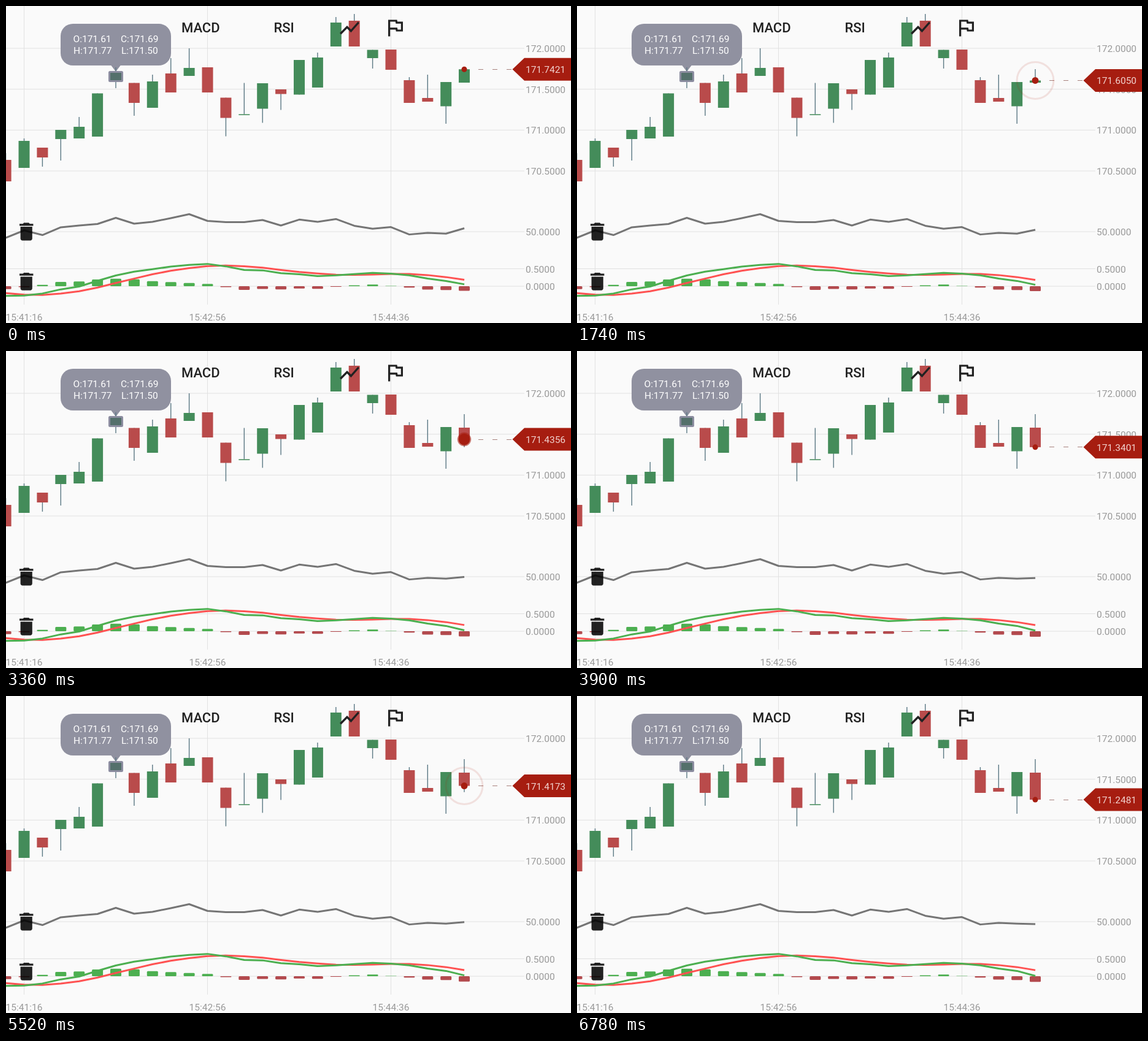
An HTML page that plays this animation: 921x517 px, repeating every 8 s.

```html
<!DOCTYPE html>
<html lang="en">
<head>
<meta charset="utf-8">
<title>Candlestick chart</title>
<style>
  html, body { margin: 0; width: 100%; height: 100%; overflow: hidden; background: #fafafa; }
  svg { display: block; width: 921px; height: 517px; font: 15.5px Roboto, sans-serif; }
</style>
</head>
<body>
<svg id="chart" viewBox="0 0 921 517"></svg>
<script>
const GREEN = '#448c5a', RED = '#b94b4b', WICK = '#5b7884', ACCENT = '#a61d10', DARK = '#212121';
const GRID = '#e1e1e1', UP_BAR = '#4caf50', DOWN_BAR = '#b34a4e';
const LOOP = 8000, BURST = 600, RIPPLE = 575, STEP = 29.9, X = 747, OPEN_Y = 125;

const svg = document.getElementById('chart');
const set = (el, attrs) => { for (const k in attrs) el.setAttribute(k, attrs[k]); };
const add = (tag, attrs, text) => {
  const el = document.createElementNS('http://www.w3.org/2000/svg', tag);
  set(el, attrs);
  if (text) el.textContent = text;
  svg.append(el);
  return el;
};
const rect = (x, y, width, height, fill, rx = 0) => add('rect', { x, y, width, height, fill, rx });
const line = (x1, y1, x2, y2, stroke, w = 1) =>
  add('line', { x1, y1, x2, y2, stroke, 'stroke-width': w });
const label = (x, y, text, fill, extra) => add('text', { x, y, fill, ...extra }, text);
const icon = (x, y, d, fill = DARK) =>
  add('path', { d, fill, transform: `translate(${x} ${y}) scale(1.6)` });
const curve = stroke =>
  add('polyline', { stroke, fill: 'none', 'stroke-width': 3, 'stroke-linejoin': 'round' });

const colX = i => 29.5 + i * STEP;
const priceY = p => 68.8 + (172 - p) * 133.4;
const mean = a => a.reduce((s, v) => s + v, 0) / a.length;

// Closing heights: a ramp and a short run off screen, then the 25 columns in view
const ramp = Array.from({ length: 8 }, (_, k) => 350 - 26 * k);
const before = [236, 232, 213, 246.5, 259, 224, 256, 253.5, 249, 301, 319, 273, 302.5, 296];
const closes = [286, 220, 247, 202, 197, 142.5, 108, 158, 123, 141, 101, 141, 182.5,
  176.5, 126, 143.5, 88, 84, 27, 66, 71.5, 104, 158, 156, 124];
const opens = [251, 264, 231, 217, 216, 213, 122, 125.5, 166, 110, 114, 100, 149.5,
  178, 167.5, 136, 144.5, 133, 66, 24, 85, 71, 121, 150, 163.5];
// Wick length beyond the body: positive above, negative below
const tails = [11, 4, -15, -35, 16, 0, -12, -21, 11, 25, 32, 0, -30,
  51, -23, -26, 0, 8, 9, 11, -17, 0, 5, 38, -28.5];
const past = [...ramp, ...before, ...closes];
const first = ramp.length + before.length;

// RSI over 14 steps, as a height around its 50 line
function rsiY(c, i) {
  let moved = 0;
  for (let k = i - 13; k <= i; k++) moved += Math.abs(c[k] - c[k - 1]);
  return 368 - 61 * (c[i - 14] - c[i]) / moved;
}

// MACD of the 7 and 20 step averages; its signal is a 4 step average
const average = (c, i, n) => mean(c.slice(Math.max(0, i - n + 1), i + 1));
const macdY = (c, i) => 457 - .427 * (average(c, i, 20) - average(c, i, 7));
const signalY = (c, i) => mean([0, 1, 2, 3].map(k => macdY(c, i - k)));
const spread = (c, i) => signalY(c, i) - macdY(c, i);

// Grid and axes
[[69, '172.0000'], [135.7, '171.5000'], [202.4, '171.0000'], [269, '170.5000'],
 [368, '50.0000'], [428.5, '0.5000'], [457, '0.0000']].forEach(([y, text]) => {
  line(0, y, 845, y, GRID);
  label(847, y + 6, text, '#999');
});
['15:41:16', '15:42:56', '15:44:36'].forEach((text, i) => {
  const x = colX(i * 10);
  line(x, 0, x, 487, GRID);
  label(x, 513, text, '#999', { 'text-anchor': 'middle' });
});

// Candles and histogram
const barBox = h => ({ y: h > 0 ? 457 - h : 457, height: Math.abs(h), rx: Math.min(1.5, Math.abs(h) / 2) });
closes.forEach((c, k) => {
  const x = colX(k - 1), o = opens[k], tail = tails[k];
  const top = Math.min(o, c), end = Math.max(o, c);
  line(x, tail > 0 ? top - tail : end - tail, x, top, WICK, 1.4);
  rect(x - 9, top, 18, end - top, c < o ? GREEN : RED);
  const h = spread(past, first + k);
  set(rect(x - 9, 0, 18, 0, h > 0 ? UP_BAR : DOWN_BAR), barBox(h));
});
const liveBar = rect(X - 9, 457, 18, 7, DOWN_BAR);

const lines = [[rsiY, '#757575'], [signalY, '#ff5252'], [macdY, UP_BAR]]
  .map(([rule, color]) => ({ rule, el: curve(color) }));

// Selected candle with callout
rect(89, 29, 180, 68, '#9091a0', 20);
add('path', { d: 'M171 96.5H187L179 107Z', fill: '#9091a0' });
line(179, 100, 179, 106, WICK, 1.4);
add('rect', { x: 168.5, y: 107.5, width: 21, height: 15, rx: 1, fill: '#54706b', stroke: '#8c8da0', 'stroke-width': 3 });
label(109.5, 59, 'O:171.61', '#fff');
label(187, 59, 'C:171.69', '#fff');
label(110, 77.5, 'H:171.77', '#fff');
label(188, 77.5, 'L:171.50', '#fff');

// Toolbar and delete buttons
const title = { 'font-size': 22, 'font-weight': 500 };
label(286, 43, 'MACD', DARK, title);
label(436.5, 43, 'RSI', DARK, title);
icon(540.8, 16.8, 'M3.5 18.49l6-6.01 4 4L22 6.92l-1.41-1.41-7.09 7.97-4-4L2 16.99z');
icon(615, 16, 'M12.36 6l.4 2H18v6h-3.36l-.4-2H7V6h5.36M14 4H5v17h2v-7h5.6l.4 2h7V6h-5.6L14 4z');
const bin = 'M6 19c0 1.1.9 2 2 2h8c1.1 0 2-.9 2-2V7H6v12zM19 4h-3.5l-1-1h-5l-1 1H5v2h14V4z';
[348.8, 430.2].forEach(y => icon(14, y, bin, 'rgba(0,0,0,.87)'));

// Live candle and price flag
const wick = line(X, 103, X, OPEN_Y, WICK, 1.4);
const body = rect(X - 9, 0, 18, 0, GREEN);
const dash = add('line', { x1: 770, x2: 826, stroke: '#86504a', opacity: .7, 'stroke-dasharray': '8 15' });
const ring = add('circle', { cx: X, fill: 'none', stroke: ACCENT, 'stroke-width': 3 });
const dot = add('circle', { cx: X, fill: ACCENT });
const flag = add('path', { d: 'M825.5 0L845 -18.5H921V18.5H845Z', fill: ACCENT });
const flagText = label(847, 0, '', '#f2d3cf');

const starts = [420, 1440, 2400, 3300, 4260, 5220, 6180];
const prices = [171.7421, 171.595, 171.6064, 171.4718, 171.3401, 171.3631, 171.425, 171.2481];

const easeOut = x => 1 - (1 - x) ** 3;

// cubic-bezier(.4, 0, .2, 1)
function standard(x) {
  let lo = 0, hi = 1;
  for (let i = 0; i < 20; i++) {
    const u = (lo + hi) / 2, v = 1 - u;
    if (1.2 * v * v * u + .6 * v * u * u + u ** 3 < x) lo = u; else hi = u;
  }
  return 3 * (1 - lo) * lo * lo + lo ** 3;
}

function draw(t) {
  const n = starts.filter(s => s <= t).length;
  const age = n ? t - starts[n - 1] : BURST;
  const k = easeOut(Math.min(1, age / BURST));
  const q = standard(Math.min(1, age / RIPPLE));
  const from = prices[Math.max(0, n - 1)];
  const price = from + (prices[n] - from) * k;
  const y = priceY(price);

  // The wick reaches each new low at once; the body follows the moving price
  set(wick, { y2: Math.max(OPEN_Y, ...prices.slice(0, n + 1).map(priceY)) });
  set(body, {
    y: Math.min(y, OPEN_Y), height: Math.max(1, Math.abs(y - OPEN_Y)),
    fill: y <= OPEN_Y ? GREEN : RED
  });

  const row = Math.floor(y) + .5;
  set(dash, { y1: row, y2: row });
  set(dot, { cy: y, r: 9.5 - 5 * q });
  set(ring, { cy: y, r: 9 + 26 * q, opacity: .6 * (1 - q) });
  set(flag, { transform: `translate(0 ${y.toFixed(2)})` });
  set(flagText, { y: y + 6 });
  flagText.textContent = price.toFixed(4);

  const all = [...past, y];
  set(liveBar, barBox(spread(all, all.length - 1)));
  for (const { rule, el } of lines) {
    const pts = [];
    for (let i = first; i < all.length; i++)
      pts.push(`${colX(i - first - 1).toFixed(1)},${rule(all, i).toFixed(2)}`);
    set(el, { points: pts.join(' ') });
  }
}

const begin = performance.now();
function tick() {
  draw((performance.now() - begin) % LOOP);
  requestAnimationFrame(tick);
}
tick();
</script>
</body>
</html>
```
